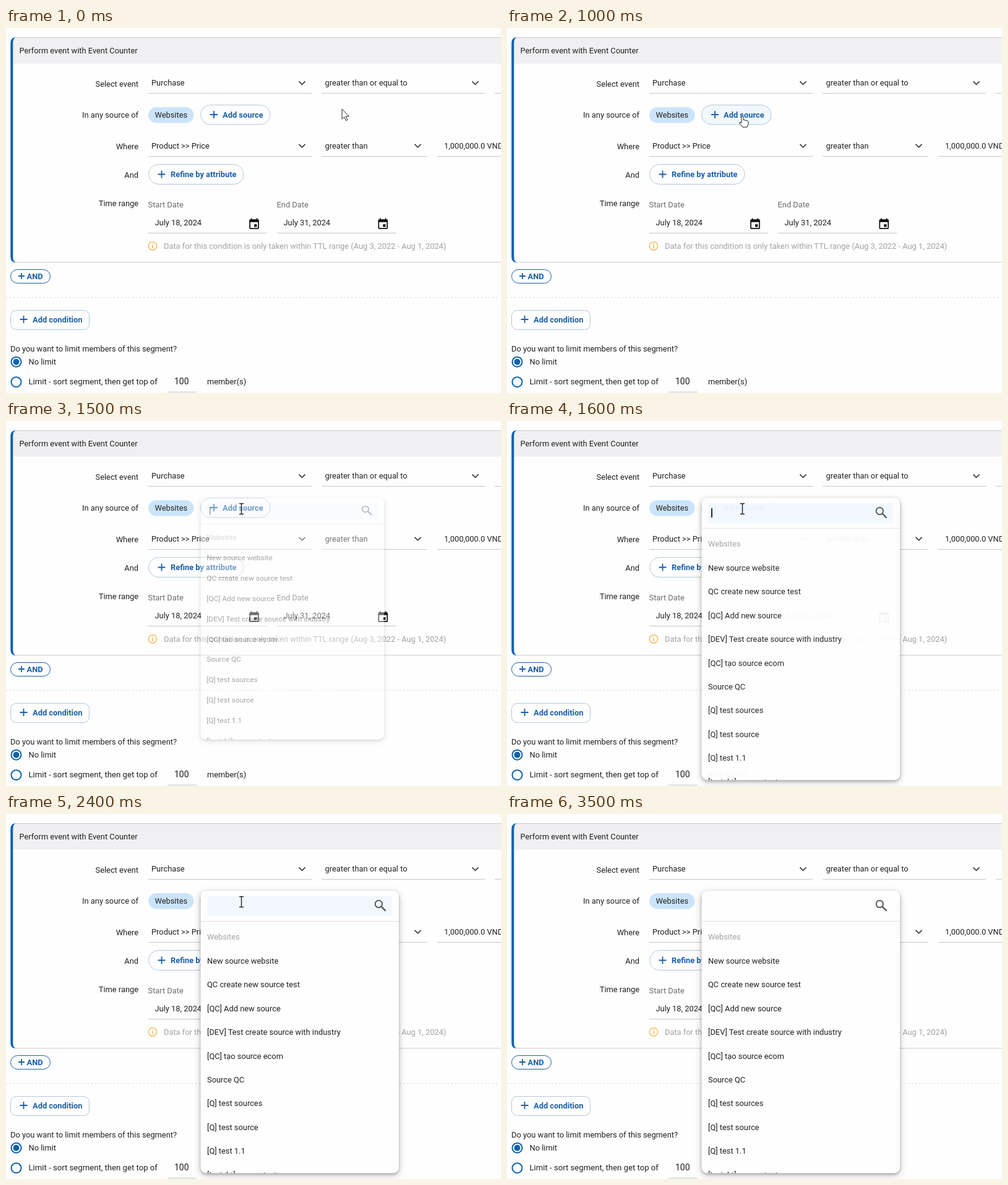
These frames come from a looping animation (800x590 px, 3600 ms). An HTML page:

```html
<!DOCTYPE html>
<html lang="en">
<head>
<meta charset="utf-8">
<title>Event condition form</title>
<style>
html, body { margin: 0; width: 100%; height: 100%; overflow: hidden; background: #fefefe; }
svg { display: block; width: 800px; height: 590px; overflow: hidden; }
text { font: 12.85px Roboto, Arial, sans-serif; fill: #212121; }
.bold { font-weight: 700; fill: #1a5fa8; }
.muted { fill: #6c6c6c; }
.pale { fill: #a2a2a2; }
.rule { stroke: #bfc8d0; }
.line { fill: none; stroke: #3c3c3c; stroke-width: 1.7; }
.plus { stroke: #1a5fa8; stroke-width: 1.8; }
.pill { fill: #fefefe; stroke: #b6c6d6; }
.radio { fill: none; stroke: #0b62ad; stroke-width: 2; }
#sheet { filter: drop-shadow(0 2px 2px rgba(0, 0, 0, .24)) drop-shadow(0 3px 6px rgba(0, 0, 0, .22)); }
#cursor > * { stroke-linejoin: round; }
</style>
</head>
<body>
<svg id="stage" viewBox="0 0 800 590"></svg>
<script>
const text = (x, y, s, cls = "", attrs = "") => `<text x="${x}" y="${y}" class="${cls}" ${attrs}>${s}</text>`;
const label = (y, s) => text(214, y, s, "", 'text-anchor="end"');
const rule = (x1, x2, y) => `<path class="rule" d="M${x1} ${y}H${x2}"/>`;
const chevron = (x, y) => `<path class="line" d="M${x - 5} ${y - 2.7}l5 5 5-5"/>`;
const plus = (x, y, r = 6) => `<path class="plus" d="M${x - r} ${y}h${2 * r}M${x} ${y - r}v${2 * r}"/>`;
const pill = (x, y, w, h, r, id = "") => `<rect class="pill" id="${id}" x="${x}" y="${y}" width="${w}" height="${h}" rx="${r}"/>`;
const calendar = x => `<path transform="translate(${x} 306.7) scale(.87)" fill="#111" d="M17 12h-5v5h5zM16 1v2H8V1H6v2H5a2 2 0 0 0-2 2v14a2 2 0 0 0 2 2h14a2 2 0 0 0 2-2V5a2 2 0 0 0-2-2h-1V1zm3 18H5V8h14z"/>`;

const form = [
  '<path d="M11.5 24.5q0-9 5-9H800V57.5H11.5z" fill="#f0eff1"/>',
  '<path d="M16 15.5H800M16 378.7H800" stroke="#c6ccd2"/>',
  '<path d="M16.5 15q-9.2 0-9.2 9V370q0 9 9.2 9q-5.2-1-5.2-9V24q0-8 5.2-9z" fill="#0a62b0"/>',
  text(21.5, 41, "Perform event with Event Counter"),
  label(95, "Select event"), text(235, 93, "Purchase"), text(515.5, 93, "greater than or equal to"),
  chevron(478.5, 89), chevron(758.5, 89),
  rule(230, 494, 105.5), rule(510, 774, 105.5), rule(790, 800, 105.5),

  label(145, "In any source of"),
  '<rect x="230" y="128" width="73.5" height="25.5" rx="12.75" fill="#cbe4fb"/>',
  text(240.5, 145, "Websites"),
  pill(314.5, 124.5, 112.5, 31.5, 15.75, "addSource"), plus(336, 140), text(350, 145, "Add source", "bold"),

  '<rect id="field" x="230" y="175" width="264" height="32" fill="#f0f7fe"/>',
  label(196, "Where"), text(235, 195, "Product &gt;&gt; Price"), text(515.5, 195, "greater than"), text(708, 195, "1,000,000.0 VND"),
  chevron(478.5, 190.5), chevron(665.5, 190.5),
  rule(230, 494, 207.5), rule(510, 681, 207.5), rule(697, 800, 207.5),

  label(242, "And"),
  pill(230.5, 220.5, 153.5, 32, 16), plus(251.5, 236.5), text(266, 241, "Refine by attribute", "bold"),

  label(288, "Time range"), text(229.5, 290, "Start Date", "muted"), text(437.5, 290, "End Date", "muted"),
  text(240.5, 319, "July 18, 2024"), text(448.5, 319, "July 31, 2024"),
  calendar(390.6), calendar(598.8),
  rule(230, 422, 331.5), rule(438, 630, 331.5),
  '<circle cx="237" cy="352.3" r="6.7" fill="none" stroke="#f0b755" stroke-width="1.4"/>',
  '<path d="M237 351v5M237 348.2v1.5" stroke="#f0b755" stroke-width="1.5"/>',
  text(255, 357, "Data for this condition is only taken within TTL range (Aug 3, 2022 - Aug 1, 2024)", "pale"),

  '<rect x="7.5" y="390.5" width="64" height="22" rx="11" fill="#fefefe" stroke="#1a5fa8"/>',
  plus(25, 401, 5), text(33.5, 406, "AND", "bold"),
  '<path d="M0 435.5H798" stroke="#d2d2d2" stroke-dasharray="2 4"/>',
  pill(7.5, 456.5, 127, 31, 9), plus(28.5, 471), text(43, 476, "Add condition", "bold"),

  text(7, 523, "Do you want to limit members of this segment?"),
  '<circle class="radio" cx="16.5" cy="539.7" r="8"/><circle cx="16.5" cy="539.7" r="5" fill="#0b62ad"/>',
  text(36.5, 544, "No limit"),
  '<circle class="radio" cx="16.5" cy="572.2" r="8"/>',
  text(36.5, 576, "Limit - sort segment, then get top of", "", 'style="font-size:13.15px"'),
  text(272, 576, "100", "", 'style="font-size:14px"'), rule(261, 308, 588.5),
  text(325, 576, "member(s)")
];

const sources = ["Websites", "New source website", "QC create new source test", "[QC] Add new source",
  "[DEV] Test create source with industry", "[QC] tạo source ecom", "Source QC", "[Q] test sources",
  "[Q] test source", "[Q] test 1.1", "[Insight] source test"];
const sheet = 'x="314.5" y="124" width="320.5" height="456.5" rx="9"';

const menu = `<clipPath id="edge"><rect ${sheet}/></clipPath>
  <g id="menu"><rect id="sheet" ${sheet} fill="#fefefe"/>
  <rect id="search" x="325" y="132.5" width="299" height="32.5" fill="#f2f8fe"/>
  <path id="caret" d="M331 141v15" stroke="#222" stroke-width="2"/>
  <g fill="none" stroke="#5c5c5c" stroke-width="2"><circle cx="602.3" cy="145.5" r="5.7"/><path d="M606.5 149.7l7 7" stroke-width="2.6"/></g>
  <path d="M314.5 173.5H635" stroke="#dfe2e5"/>
  <g clip-path="url(#edge)">${sources.map((s, i) => text(325, Math.round(203.48 + i * 38.42), s, i ? "" : "pale")).join("")}</g></g>`;

const cursor = `<g id="cursor">
  <path id="arrow" d="M0 0V16.2l3.8-3.5 2.6 6 2.5-1.1-2.6-5.8H11.3z" fill="#fff" stroke="#222"/>
  <path id="hand" d="M-1.5 1q1.5-2 3 0v5.5l6 1.2q2 .5 2 2.5v3l-2 5h-7l-5-6q-1-2 1-2l2 1.5z" fill="#fff" stroke="#222"/>
  <path id="beam" d="M-3.5 -8.5h2.5l1 1 1-1h2.5M0 -7.5v15M-3.5 8.5h2.5l1-1 1 1h2.5" fill="none" stroke="#222" stroke-width="1.4"/></g>`;

const byId = id => document.getElementById(id);
byId("stage").innerHTML = form.join("") + menu + cursor;

const show = (id, on) => byId(id).setAttribute("visibility", on ? "inherit" : "hidden");
const clamp = v => Math.max(0, Math.min(1, v));

// Pointer stops: time, x, y
const stops = [[0, 543, 131], [500, 398, 172], [800, 380.5, 142], [2400, 380.5, 142], [2900, 840, 70]];

function pointer(t) {
  let p = stops[0].slice(1);
  for (let i = 1; i < stops.length; i++) {
    const [t0, x0, y0] = stops[i - 1], [t1, x1, y1] = stops[i];
    if (t < t0) break;
    const k = clamp((t - t0) / (t1 - t0)), e = k * k * (3 - 2 * k);
    p = [x0 + (x1 - x0) * e, y0 + (y1 - y0) * e];
  }
  return p;
}

function draw(now) {
  const t = Math.floor(now % 3600 / 100) * 100;
  const [x, y] = pointer(t);
  const open = t >= 1400;
  const overSearch = open && x < 624 && y > 132;
  const overButton = t >= 700 && !open;

  byId("cursor").setAttribute("transform", `translate(${x} ${y})`);
  show("beam", overSearch);
  show("hand", overButton);
  show("arrow", !overSearch && !overButton);
  show("field", t >= 400 && t < 600);
  byId("addSource").style.fill = overButton ? "#f1f8fe" : "";

  // The menu grows from its top left corner while it fades in
  const k = clamp((t - 1300) / 300);
  const s = 1 - .25 * (1 - k) ** 1.1;
  byId("menu").setAttribute("transform", `translate(314.5 124) scale(${s} ${s * s}) translate(-314.5 -124)`);
  byId("menu").setAttribute("opacity", t < 1700 ? .96 * k ** 2.2 : 1);
  show("menu", open);
  show("search", overSearch);
  show("caret", open && (t - 1400) % 1060 < 530);
  requestAnimationFrame(draw);
}
draw(0);
</script>
</body>
</html>
```
